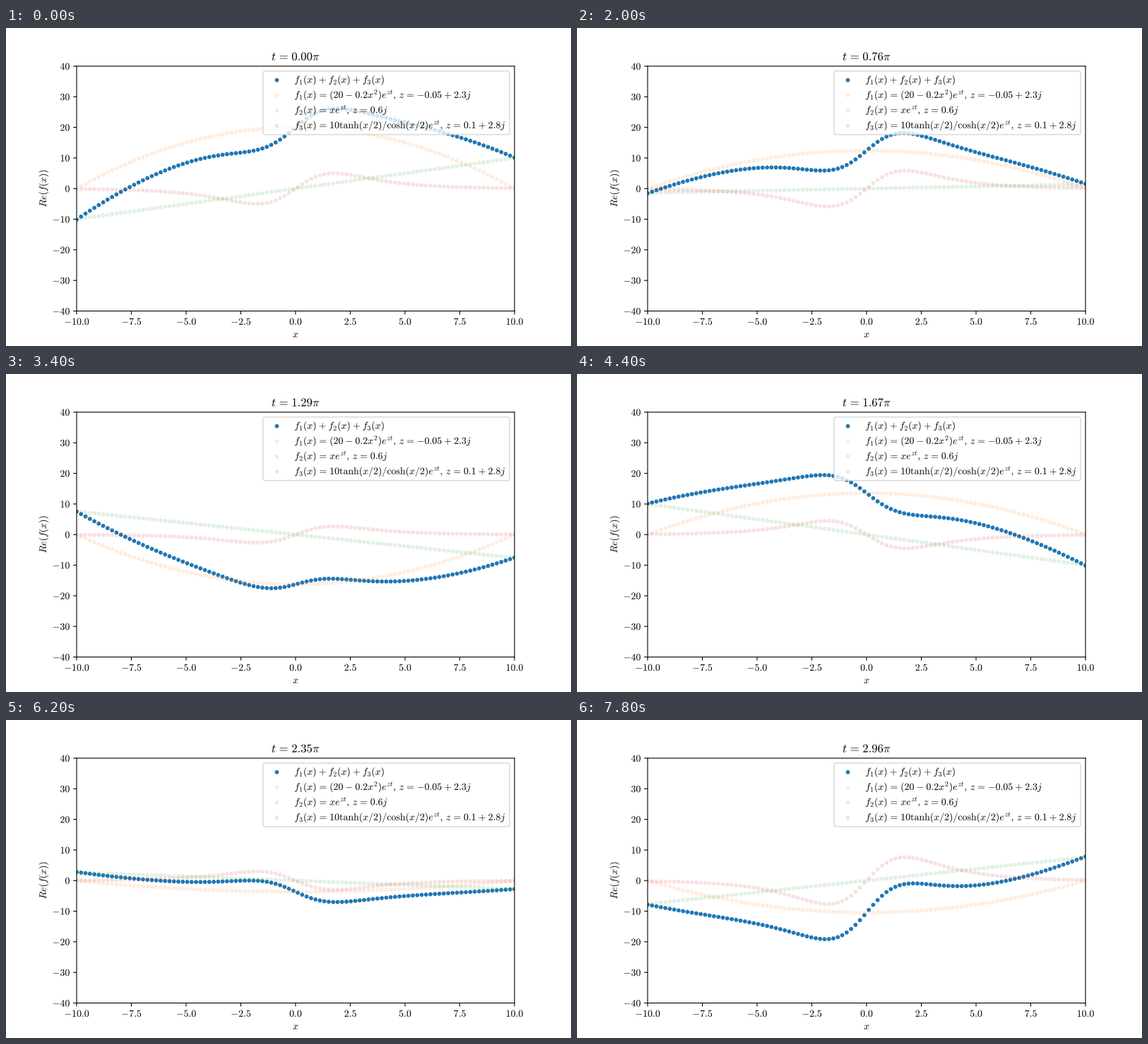
Recreate the animation shown at these times as a matplotlib script. Size 800 by 450 pixels, loop 8 s.

```python
import numpy as np
import matplotlib.pyplot as plt
from matplotlib.animation import FuncAnimation
from matplotlib.patches import FancyBboxPatch, PathPatch
from matplotlib.textpath import TextPath
from matplotlib.transforms import Affine2D

plt.rcParams["mathtext.fontset"] = "cm"

W, H, DPI = 800, 450, 100
FRAMES, INTERVAL = 40, 200
STEP = 6 * np.pi / 79
LEFT, BOTTOM = 100, 400.5
COLORS = ["#1f77b4", "#ff7f0e", "#2ca02c", "#d62728"]
ALPHAS = [1, 0.1, 0.1, 0.1]

x = np.linspace(-10, 10, 100)
WAVES = [
    (20 - 0.2 * x**2, -0.05 + 2.3j),
    (x, 0.6j),
    (10 * np.tanh(x / 2) / np.cosh(x / 2), 0.1 + 2.8j),
]
LABELS = [
    r"f_1(x) + f_2(x) + f_3(x)",
    r"f_1(x) = (20 - 0.2x^2)e^{zt}; z = {-}0.05 + 2.3j",
    r"f_2(x) = xe^{zt}; z = 0.6j",
    r"f_3(x) = 10\mathrm{tanh}(x/2)/\mathrm{cosh}(x/2)e^{zt}; z = 0.1 + 2.8j",
]


def glyphs(s, size=10):
    """Math text outlines with TeX-like gaps around operators and after commas."""
    for op, gap in (("=", 0.117), ("+", 0.053), ("-", 0.053)):
        pad = r"\hspace{%g}" % gap
        s = s.replace(f" {op} ", pad + op + pad)
    s = s.replace("; ", r"{,}\hspace{0.38}")
    return TextPath((0, 0), f"${s}$", size=size * DPI / 72)


def curves(t):
    parts = [(amp * np.exp(z * t)).real for amp, z in WAVES]
    return [sum(parts)] + parts


fig = plt.figure(figsize=(W / DPI, H / DPI), dpi=DPI, facecolor="white")
ax = fig.add_axes([0.125, 0.11, 0.775, 0.77])
ax.set(xlim=(-10, 10), ylim=(-40, 40), xticks=[], yticks=[])
for spine in ax.spines.values():
    spine.set_snap(False)

# Overlay whose data units are stage pixels, y pointing down
over = fig.add_axes([0, 0, 1, 1])
over.set(xlim=(0, W), ylim=(H, 0))
over.axis("off")


def put(px, py, s, align=0.5, size=10, angle=0):
    """Text with its baseline at py; align 0, 0.5, 1 is left, centre, right."""
    path = glyphs(s, size)
    advance = path.get_extents().x1 + 0.05 * size
    move = (Affine2D().translate(-align * advance, 0).rotate_deg(angle)
            .scale(1, -1).translate(px, py))
    patch = PathPatch(path, facecolor="black", linewidth=0, snap=False,
                      zorder=6, transform=move + over.transData)
    return over.add_patch(patch)


def tick(xs, ys):
    over.plot(xs, ys, color="black", linewidth=0.8, snap=False,
              solid_capstyle="butt")


def scatter(axes, xs, ys, i, **kw):
    # One size per dot keeps their positions free of pixel rounding
    return axes.scatter(xs, ys, s=np.full(len(xs), 10.0), color=COLORS[i],
                        alpha=ALPHAS[i], **kw)


for v in np.linspace(-10, 10, 9):
    px = 410 + 31 * v
    tick([px, px], [BOTTOM, BOTTOM + 4.86])
    put(px, 419.9, f"{v:.1f}")
for v in range(-40, 41, 10):
    py = 227.25 - 4.33125 * v
    tick([LEFT - 4.86, LEFT], [py, py])
    put(90.3, py + 4.8, str(v), align=1)
put(410, 437.7, "x")
put(56.8, 227.25, "Re(f(x))", angle=90)
title = put(410, 45.67, r"t = 0.00\pi", size=12)

over.add_patch(FancyBboxPatch(
    (364, 60.94), 349.06, 89.9, boxstyle="round,pad=0,rounding_size=2.78",
    facecolor="white", edgecolor="0.8", alpha=0.8, linewidth=1,
    snap=False, zorder=4))

dots = []
for i, label in enumerate(LABELS):
    dots.append(scatter(ax, x, 0 * x, i))
    row = 77.4 + 21.5 * i
    # A second, empty position keeps the key dot on the same drawing path
    scatter(over, [383.5, np.nan], [row - 3.6, np.nan], i, zorder=5)
    put(408.4, row, label, align=0)


def update(n):
    t = n * STEP
    for dot, y in zip(dots, curves(t)):
        dot.set_offsets(np.column_stack([x, y]))
    title.set_path(glyphs(rf"t = {t / np.pi:.2f}\pi", 12))
    return [*dots, title]


anim = FuncAnimation(fig, update, frames=FRAMES, interval=INTERVAL,
                     repeat=True, repeat_delay=0)
plt.show()
```
